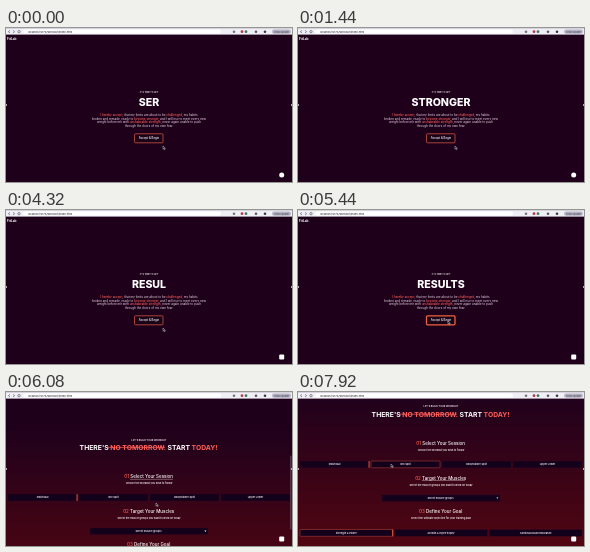
Write an HTML page that moves like this. It is 286 px wide and 154 px high and loops after 8 s.

```html
<!DOCTYPE html>
<html lang="en">
<head>
<meta charset="utf-8">
<title>Workout builder</title>
<style>
  html, body { margin: 0; width: 100%; height: 100%; overflow: hidden; background: #1e001b; }
  svg { display: block; width: 100vw; height: 100vh; }
  text { font-family: Inter, "Open Sans", sans-serif; fill: #fff; white-space: pre; }
  .mid { text-anchor: middle; }
  .small { font-size: 2.5px; font-weight: 600; fill: #f4eaf0; }
  .copy { font-size: 3px; font-weight: 500; fill: #d2bdcc; }
  .red { fill: #ff5f57; }
  .box { fill: #13001b; stroke: #3a0820; stroke-width: .3; }
  .box.on { stroke: #b8483c; stroke-width: .5; }
  .edge { fill: #f0603f; }
  #begin { fill: #180318; stroke: #cf533e; stroke-width: .8; }
  #begin.on { stroke: #f0603f; stroke-width: 1.3; }
</style>
</head>
<body>
<svg viewBox="0 0 286 154" preserveAspectRatio="none">
  <defs>
    <linearGradient id="warm" x1="0" y1="0" x2="0" y2="1">
      <stop offset="0" stop-color="#20011c"/>
      <stop offset="1" stop-color="#510612"/>
    </linearGradient>
  </defs>
  <g id="page">
    <rect width="286" height="160" fill="#1e001b"/>
    <text x="1" y="11.6" font-size="3.2" font-weight="700">FitLab</text>
    <text class="mid small" x="143" y="65.3" style="font-size:2.2px">IT'S TIME TO GET</text>
    <text class="mid" id="word" x="143" y="77.8" font-size="10.6" font-weight="800"></text>
    <g id="copy"></g>
    <rect id="begin" x="128.5" y="105.8" width="28.5" height="9" rx="1"/>
    <text class="mid small" x="143" y="111.3" style="font-size:2.8px">Accept &amp; Begin</text>
    <g transform="translate(0 147)">
      <rect y="5" width="286" height="149" fill="url(#warm)"/>
      <g id="builder">
        <text class="mid small" x="143" y="15.4" style="font-size:2.4px">LET'S BUILD YOUR WORKOUT</text>
        <text class="mid" x="142.6" y="24.6" font-size="6.8" font-weight="700">THERE'S <tspan class="red">NO TOMORROW.</tspan> START <tspan class="red">TODAY!</tspan></text>
        <rect x="102" y="21.8" width="57" height=".7" fill="#ff5f57"/>
      </g>
    </g>
  </g>
  <g id="bar">
    <rect width="286" height="6.6" fill="#f1eff6"/>
    <rect width="286" height="1" fill="#d5d2dc"/>
    <rect x="17" y="1.6" width="198" height="4" rx="2" fill="#fff"/>
    <g fill="none" stroke="#4a4654" stroke-width=".6">
      <path d="M4 2.4L2.4 3.7L4 5M7 2.4L8.6 3.7L7 5"/>
      <circle cx="13" cy="3.7" r="1.2"/>
    </g>
    <text x="22" y="4.7" font-size="2.7" font-weight="500" style="fill:#38343f">localhost:5173/workout/index.html</text>
    <circle cx="228" cy="3.7" r="1.3" fill="#77727f"/>
    <circle cx="236" cy="3.7" r="1.4" fill="#b8384a"/>
    <circle cx="240" cy="3.7" r="1.4" fill="#3d7a5c"/>
    <circle cx="250" cy="3.7" r="1.3" fill="#5a5562"/>
    <circle cx="259" cy="3.7" r="1.3" fill="#3a3642"/>
    <rect x="266" y="1.6" width="19" height="4.2" rx="2.1" fill="#b4b2c4"/>
    <text class="mid" x="275.5" y="4.5" font-size="2.3" style="fill:#3a3642">Finish update</text>
  </g>
  <rect id="scrollbar" x="284" width="1.6" height="74" rx=".8" fill="#a090a0"/>
  <g fill="#d9d0d8">
    <rect y="76.2" width="1" height="1.6"/>
    <rect x="285" y="76.2" width="1" height="1.6"/>
  </g>
  <rect id="badge" x="273.2" y="144.6" width="5" height="5" fill="#fff"/>
  <path id="pointer" d="M0 0V3.2L.8 2.5L1.4 3.7L1.9 3.4L1.4 2.3H2.4Z" fill="#000" stroke="#fff" stroke-width=".4"/>
</svg>
<script>
const LOOP = 8000;
const $ = id => document.getElementById(id);

function add(parent, tag, attrs, content = "") {
  const el = document.createElementNS("http://www.w3.org/2000/svg", tag);
  for (const key in attrs) el.setAttribute(key, attrs[key]);
  el.textContent = content;
  parent.append(el);
  return el;
}

// Asterisks mark the red phrases.
[
  "*I hereby accept*, that my limits are about to be *challenged*, my habits",
  "broken and remade, ready to *become stronger*, and I will rise to meet every new",
  "weight before me with *unshakeable strength*, never again unable to push",
  "through the doors of my own fear."
].forEach((line, i) => {
  const row = add($("copy"), "text", { class: "mid copy", x: 143, y: 88 + i * 3.7 });
  line.split("*").forEach((part, n) => add(row, "tspan", n % 2 ? { class: "red" } : {}, part));
});

const builder = $("builder");

function heading(y, number, title, note) {
  const el = add(builder, "text", { class: "mid", x: 142.7, y, "font-size": 4.5, "font-weight": 500 });
  add(el, "tspan", { class: "red" }, number);
  add(el, "tspan", {}, " " + title);
  add(builder, "text", { class: "mid small", x: 143, y: y + 6.1 }, note);
}

function choices(y, labels) {
  const step = 284 / labels.length;
  const boxes = labels.map((label, i) => {
    const x = 2 + i * step;
    const box = add(builder, "rect", { class: "box", x, y, width: step - 2, height: 6.8, rx: .7 });
    add(builder, "text", { class: "mid small", x: x + step / 2 - 1, y: y + 4.3 }, label);
    return box;
  });
  // The first choice is selected and shows a bright right edge.
  add(builder, "rect", { class: "edge", x: step - .4, y, width: .9, height: 6.8 });
  return boxes;
}

heading(52.8, "01", "Select Your Session", "Choose the workout you wish to follow");
const sessions = choices(69, ["Individual", "Bro Split", "Bodybuilder Split", "Upper Lower"]);
heading(87.6, "02", "Target Your Muscles", "Select the muscle groups you want to work on today");
add(builder, "rect", { class: "box", x: 84, y: 102.8, width: 118, height: 6.6, rx: .7 });
add(builder, "text", { class: "mid small", x: 142.5, y: 107 }, "Select muscle groups");
add(builder, "path", { d: "M198.4 105.5h2l-1 1.3z", fill: "#fff" });
heading(121.2, "03", "Define Your Goal", "Select the ultimate objective for your training plan");
choices(137.5, ["Strength & Power", "Growth & Hypertrophy", "Cardiovascular Endurance"])[0].classList.add("on");

const underlines = [53.8, 88.6].map(y =>
  add(builder, "rect", { x: 124, y, width: 43, height: .4, fill: "#e8d0d6" }));

const progress = (t, start, end) => Math.min(1, Math.max(0, (t - start) / (end - start)));
const ease = p => (1 - Math.cos(Math.PI * p)) / 2;

// Each entry: word, typing start, ms per letter, deleting start, ms per letter.
const typing = [
  ["SERIOUS", -3000, 135, -240, 60],
  ["STRONGER", 230, 135, 2990, 75],
  ["RESULTS", 3600, 135, 9000, 75]
];

function wordAt(t) {
  const [word, typeAt, typeMs, eraseAt, eraseMs] = typing.findLast(entry => t >= entry[1]);
  const typed = Math.min(word.length, Math.floor((t - typeAt) / typeMs));
  const erased = Math.max(0, Math.floor((t - eraseAt) / eraseMs));
  return word.slice(0, Math.max(0, typed - erased));
}

function pointerAt(t) {
  const a = ease(progress(t, 4600, 5250));
  const b = ease(progress(t, 6900, 7600));
  return [157 - 7 * a - 57 * b, 118 - 7 * a - 39 * b];
}

function draw(t) {
  const scrolled = ease(progress(t, 5735, 6240));
  const [x, y] = pointerAt(t);
  $("page").setAttribute("transform", `translate(0 ${-147 * scrolled})`);
  $("pointer").setAttribute("transform", `translate(${x} ${y})`);
  $("word").textContent = wordAt(t);
  $("begin").classList.toggle("on", t >= 5120);
  sessions[1].classList.toggle("on", t >= 7400);
  $("scrollbar").setAttribute("y", 7 + 73 * scrolled);
  $("scrollbar").style.opacity = t < 5735 ? 0 : .35 * (1 - progress(t, 6800, 7100));
  const moving = t < 6160;
  underlines[0].style.opacity = +moving;
  underlines[1].style.opacity = +!moving;
  $("badge").setAttribute("rx", t < 1700 ? 2.5 : 1);
}

const begin = performance.now();
function tick() {
  draw((performance.now() - begin) % LOOP);
  requestAnimationFrame(tick);
}
tick();
</script>
</body>
</html>
```
